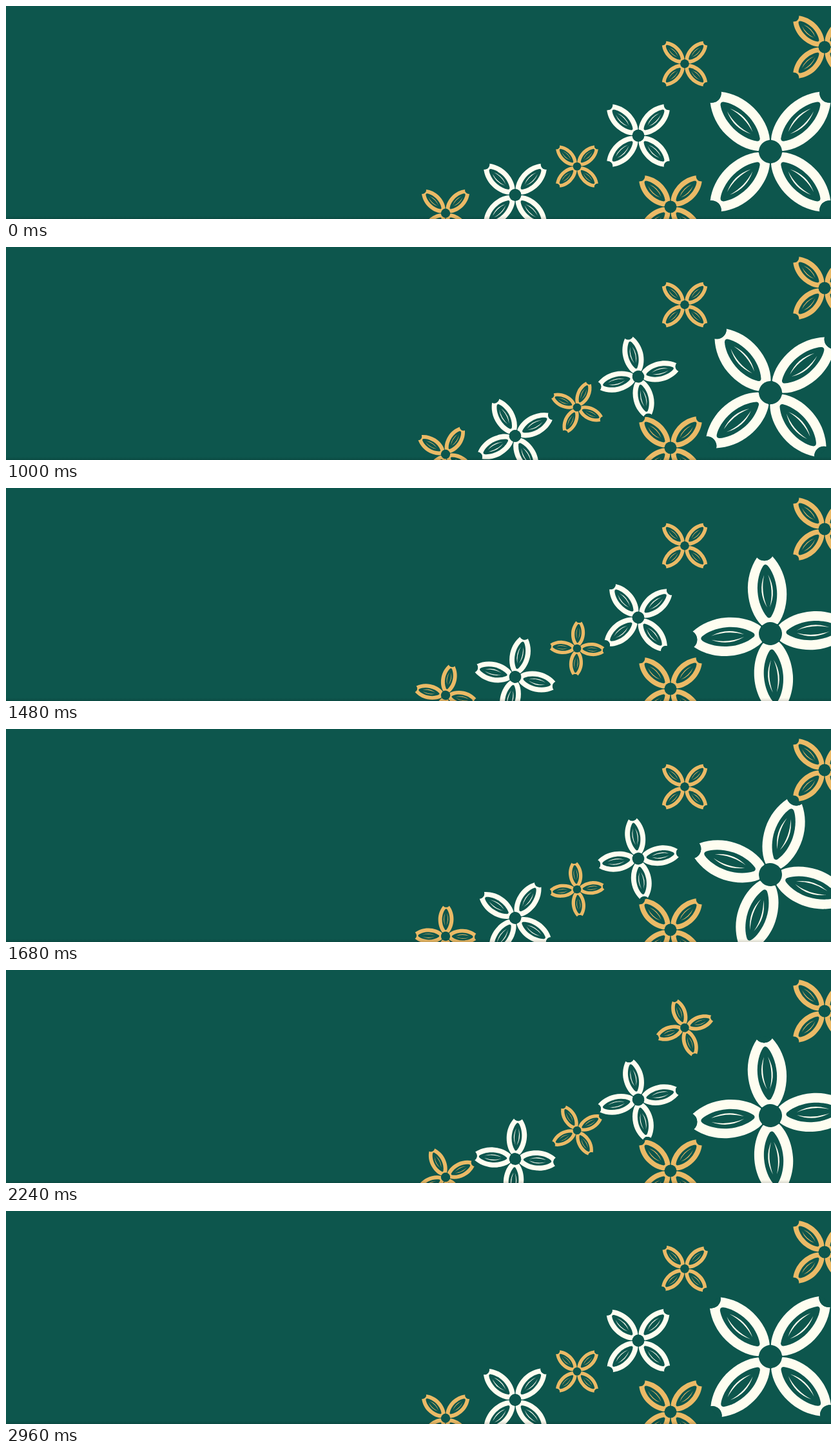
Recreate the animation shown at these times as an HTML page. Size 1280x332 px, loop 3 s.

```html
<!DOCTYPE html>
<html lang="en">
<head>
<meta charset="utf-8">
<title>Turning blossoms</title>
<style>
  html, body { margin: 0; width: 100%; height: 100%; overflow: hidden; background: #0d564d; }
  svg { display: block; width: 100%; height: 100%; }
  .ground { fill: #0d564d; }
  .cream { fill: #fefdf0; }
  .gold { fill: #ebba66; }
</style>
</head>
<body>
<svg viewBox="0 0 1280 332">
  <defs>
    <linearGradient id="edge" x2="0" y2="1">
      <stop offset="0" stop-color="#000" stop-opacity="0"/>
      <stop offset="1" stop-color="#000" stop-opacity=".14"/>
    </linearGradient>
    <g id="petal">
      <path d="M-12.6-14C-24-27-30-47-30-67C-30-87-23-106-12-120A15 15 0 0 0 12-120C23-106 30-87 30-67C30-47 24-27 12.6-14Z"/>
      <path class="ground" d="M-12-120A15 15 0 0 0 12-120Q0-127-12-120Z"/>
      <path class="ground" d="M-3-26C-11-37-15-52-15-66C-15-84-9-99-3.5-106Q0-110 3.5-106C9-99 15-84 15-66C15-52 11-37 3-26Q0-23-3-26Z"/>
      <path d="M-2-41Q-15-66-3-92Q-10.5-66-2-41ZM2-41Q15-66 3-92Q10.5-66 2-41Z"/>
    </g>
    <g id="flower">
      <use href="#petal" transform="rotate(45)"/>
      <use href="#petal" transform="rotate(135)"/>
      <use href="#petal" transform="rotate(225)"/>
      <use href="#petal" transform="rotate(315)"/>
      <circle class="ground" r="18"/>
    </g>
  </defs>
  <rect class="ground" width="1280" height="332"/>
  <g id="garden"></g>
  <rect y="327" width="1280" height="5" fill="url(#edge)"/>
</svg>
<script>
  const LOOP = 3000, STEP = 40, HOLD = 120, END = 3040;

  // turn: total degrees, start: when the turn begins (ms)
  const flowers = [
    { x: 1031, y: 313, size: 0.522, tone: "gold" },
    { x: 1270, y: 64, size: 0.522, tone: "gold" },
    { x: 1053, y: 90, size: 0.377, tone: "gold", turn: -180, start: 1690 },
    { x: 682, y: 323, size: 0.396, tone: "gold", turn: -90, start: 365 },
    { x: 886, y: 250, size: 0.352, tone: "gold", turn: -90, start: 80 },
    { x: 790, y: 294.5, size: 0.522, tone: "cream", turn: 180, start: 513 },
    { x: 981, y: 202, size: 0.522, tone: "cream", turn: 270, start: 418 },
    { x: 1186, y: 227, size: 1, tone: "cream", turn: 180, start: 760 }
  ];

  const garden = document.getElementById("garden");
  for (const f of flowers) {
    f.node = document.createElementNS("http://www.w3.org/2000/svg", "use");
    f.node.setAttribute("href", "#flower");
    f.node.setAttribute("class", f.tone);
    garden.append(f.node);
  }

  const ease = p => (1 - Math.cos(Math.PI * p)) / 2;

  function angle(f, t) {
    if (!f.turn || t < HOLD) return 0;
    const p = (t - f.start) / (END - f.start);
    return f.turn * ease(Math.min(1, Math.max(0, p)));
  }

  function draw(t) {
    for (const f of flowers) {
      f.node.setAttribute("transform",
        `translate(${f.x} ${f.y}) rotate(${angle(f, t).toFixed(3)}) scale(${f.size})`);
    }
  }

  const begin = performance.now();
  function tick() {
    const t = (performance.now() - begin) % LOOP;
    draw(Math.floor(t / STEP) * STEP);
    requestAnimationFrame(tick);
  }
  draw(0);
  requestAnimationFrame(tick);
</script>
</body>
</html>
```
